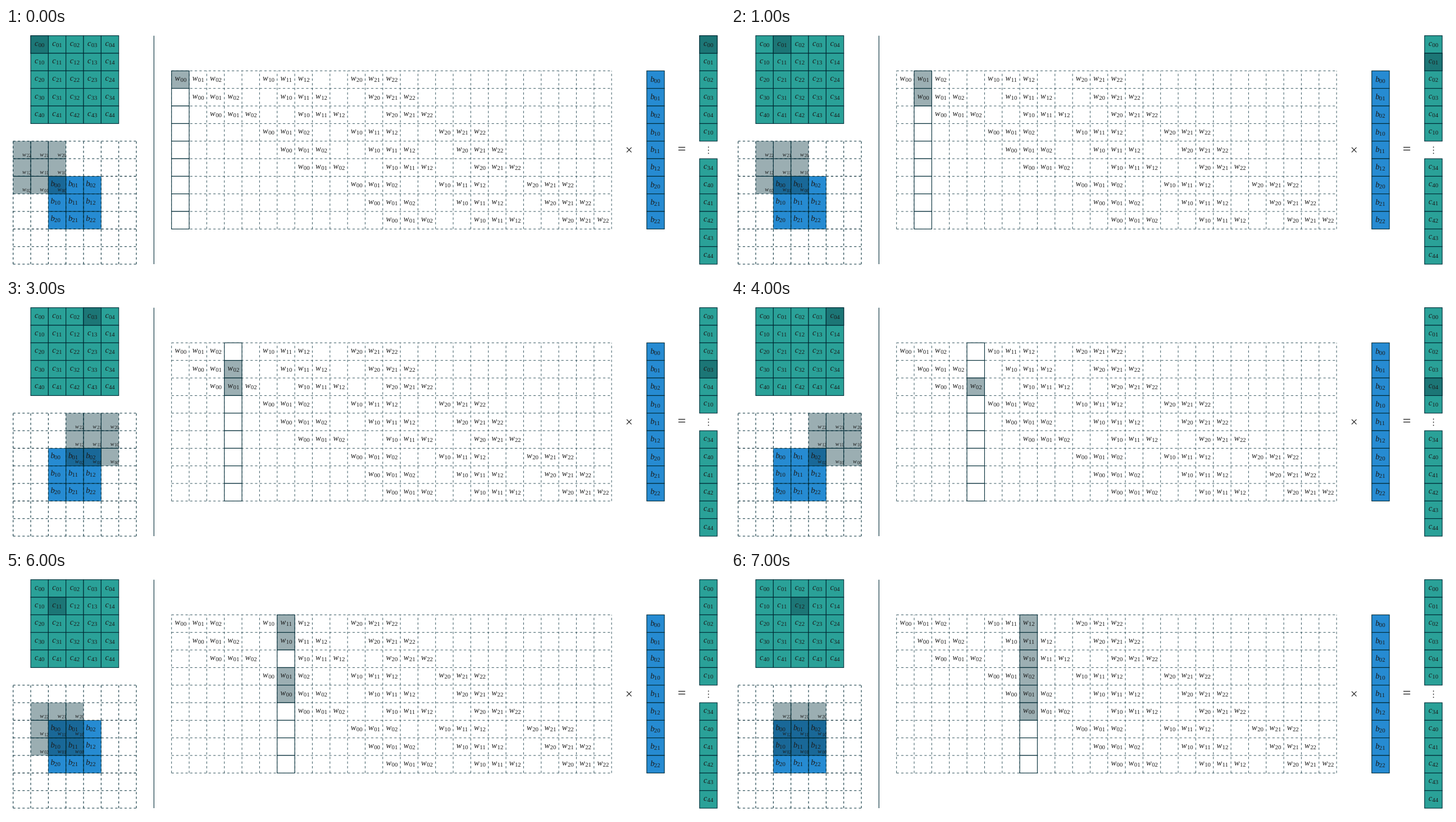
Recreate the animation shown at these times as an HTML page. Size 1280x435 px, loop 8000 ms.

```html
<!DOCTYPE html>
<html lang="en">
<head>
<meta charset="utf-8">
<title>Convolution as matrix product</title>
<style>
  html, body { margin: 0; width: 100%; height: 100%; overflow: hidden; background: #fff; }
  svg { display: block; width: 100vw; height: 100vh; }
  text { font-family: "Liberation Serif", serif; fill: #1c1c1c; }
  .var { font-style: italic; }
  .sub { font-style: normal; }
</style>
</head>
<body>
<svg id="stage" viewBox="0 0 1280 435"></svg>
<script>
const U = 31.335, X0 = 12.7, Y0 = 13.7;
const INK = '#002b36', SHADE = '#073642', TEAL = '#2aa198', TEAL_DARK = '#1c7676', BLUE = '#268bd2', GRAY = '#9cafb3';
const THICK = 1.1, MEDIUM = .8, THIN = .55, DASH = 4.13;
const STEP_MS = 1000, STEPS = 8;
const px = col => X0 + col * U;
const py = row => Y0 + row * U;

function add(parent, tag, attrs = {}, content = '') {
  const el = document.createElementNS('http://www.w3.org/2000/svg', tag);
  for (const key in attrs) el.setAttribute(key, attrs[key]);
  el.textContent = content;
  parent.appendChild(el);
  return el;
}

const stage = document.getElementById('stage');
const [base, active, labels] = [0, 1, 2].map(() => add(stage, 'g'));

function square(parent, x, y, fill, cells = 1, width = THICK, extra = {}) {
  const size = cells * U;
  return add(parent, 'rect', { x, y, width: size, height: size, fill, stroke: INK, 'stroke-width': width, ...extra });
}

function line(parent, x1, y1, x2, y2, width = THICK, dash = 'none') {
  add(parent, 'line', { x1, y1, x2, y2, stroke: INK, 'stroke-width': width, 'stroke-dasharray': dash });
}

function dashedGrid(col, row, cols, rows, width) {
  for (let r = 0; r <= rows; r++) line(base, px(col), py(row + r), px(col + cols), py(row + r), width, DASH);
  for (let c = 0; c <= cols; c++) line(base, px(col + c), py(row + rows), px(col + c), py(row), width, DASH);
}

// Inner lines of a 3 by 3 block
function innerLines(parent, x, y) {
  for (const d of [U, 2 * U]) {
    line(parent, x + d, y, x + d, y + 3 * U);
    line(parent, x, y + d, x + 3 * U, y + d);
  }
}

// Letter with a two-digit index; styles: offset, baseline, index offset, sizes.
const STYLE = {
  w: [5.7, 18, 10.1, 14.5, 10.8],
  c: [7, 18, 6.6, 14.5, 10.8],
  b: [6.5, 19.3, 6.5, 14.5, 10.8],
  bCorner: [4.2, 17.2, 6.5, 14.5, 10.8],
  wSmall: [16.3, 27, 7.9, 10.3, 7.5]
};
function label(parent, letter, i, j, x, y, style = letter) {
  const [dx, dy, gap, size, subSize] = STYLE[style];
  const text = add(parent, 'text', { x: x + dx, y: y + dy, 'font-size': size, class: 'var' }, letter);
  add(text, 'tspan', { x: x + dx + gap, y: y + dy + size * .14, 'font-size': subSize, class: 'sub' }, `${i}${j}`);
}

function weight(row, col) {
  const i = Math.floor(col / 5) - Math.floor(row / 3);
  const j = col % 5 - row % 3;
  return i >= 0 && i < 3 && j >= 0 && j < 3 ? [i, j] : null;
}

// Output as a square and as a column
for (let n = 0; n < 25; n++) {
  const i = Math.floor(n / 5), j = n % 5;
  const places = [[1 + j, i]];
  if (n < 6) places.push([39, n]);
  if (n > 18) places.push([39, n - 12]);
  for (const [col, row] of places) {
    square(base, px(col), py(row), TEAL);
    label(labels, 'c', i, j, px(col), py(row));
  }
}

// Padded input and the input column
square(base, px(2), py(8), BLUE, 3, THIN);
innerLines(base, px(2), py(8));
dashedGrid(0, 6, 7, 7, THICK);
for (let n = 0; n < 9; n++) {
  const i = Math.floor(n / 3), j = n % 3;
  label(labels, 'b', i, j, px(2 + j), py(8 + i), 'bCorner');
  square(base, px(36), py(2 + n), BLUE);
  label(labels, 'b', i, j, px(36), py(2 + n));
}

// Weight matrix
dashedGrid(9, 2, 25, 9, MEDIUM);
for (let row = 0; row < 9; row++) {
  for (let col = 0; col < 25; col++) {
    const w = weight(row, col);
    if (w) label(labels, 'w', ...w, px(9 + col), py(2 + row));
  }
}

// Separator and operators
line(base, px(8), py(0), px(8), py(13));
const sign = { 'text-anchor': 'middle' };
add(labels, 'text', { ...sign, x: 1109.3, y: 225, 'font-size': 23 }, '×');
add(labels, 'text', { ...sign, x: 1203.2, y: 224, 'font-size': 26 }, '=');
for (const cy of [212.3, 217.8, 223.3]) add(labels, 'circle', { cx: 1250.6, cy, r: .9 });

// Moving parts
const squareMark = square(active, 0, 0, TEAL_DARK);
const columnMark = square(active, px(39), 0, TEAL_DARK);
const strip = add(active, 'g');
const stripCells = Array.from({ length: 9 }, (_, r) => square(strip, 0, py(2 + r), '#fff'));
const kernel = add(active, 'g');
square(kernel, 0, 0, SHADE, 3, THIN, { opacity: .4 });
innerLines(kernel, 0, 0);
for (let n = 0; n < 9; n++) {
  const i = Math.floor(n / 3), j = n % 3;
  label(kernel, 'w', 2 - i, 2 - j, j * U, i * U, 'wSmall');
}

function show(step) {
  const i = Math.floor(step / 5), j = step % 5;
  squareMark.setAttribute('x', px(1 + j));
  squareMark.setAttribute('y', py(i));
  columnMark.setAttribute('y', py(step));
  columnMark.setAttribute('visibility', step < 6 ? 'visible' : 'hidden');
  kernel.setAttribute('transform', `translate(${px(j)} ${py(6 + i)})`);
  strip.setAttribute('transform', `translate(${px(9 + step)} 0)`);
  stripCells.forEach((rect, row) => rect.setAttribute('fill', weight(row, step) ? GRAY : '#fff'));
}

const start = performance.now();
let shown = -1;
function tick() {
  const step = Math.floor((performance.now() - start) / STEP_MS) % STEPS;
  if (step !== shown) show(shown = step);
  requestAnimationFrame(tick);
}
tick();
</script>
</body>
</html>
```
